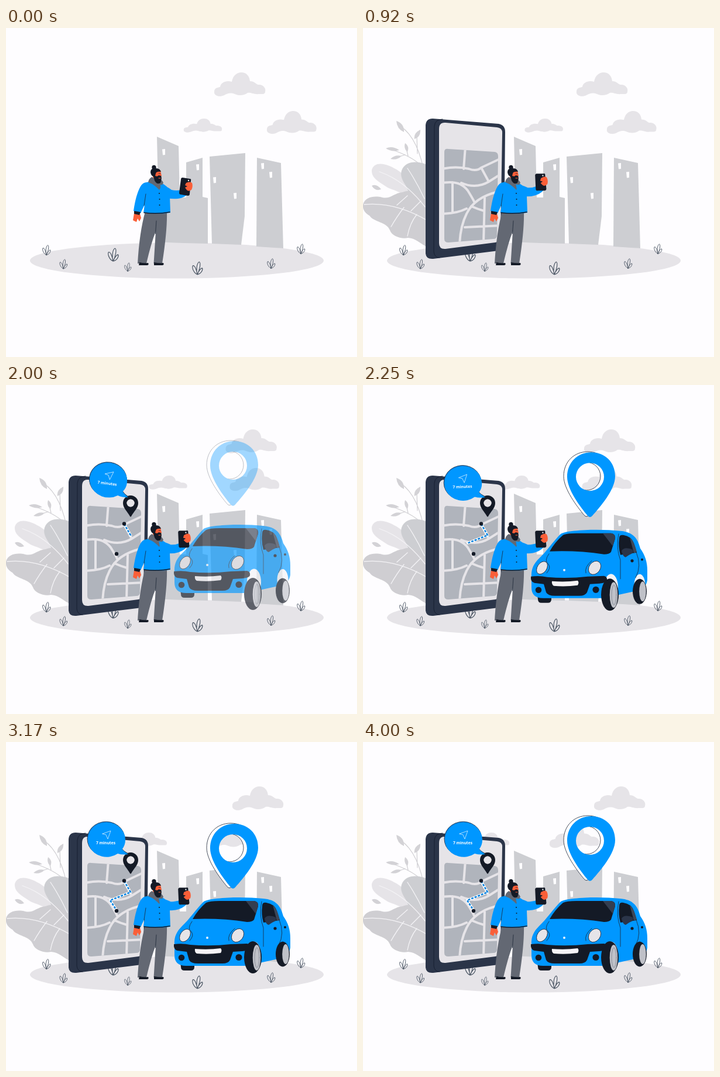
These frames come from a looping animation (600 by 563 pixels, 4080 ms). An HTML page:

```html
<!DOCTYPE html>
<html lang="en">
<head>
<meta charset="utf-8">
<title>Ride booking</title>
<style>
html, body { margin: 0; width: 100%; height: 100%; overflow: hidden; background: #fefdff; }
svg { display: block; width: 100%; height: 100%; }
.line { fill: none; stroke-linecap: round; stroke-linejoin: round; }
.blue { fill: #0097ff; }
.ink { fill: #141a26; }
.navy { fill: #2b3549; }
.skin { fill: #fa5f38; }
.pale { fill: #e6e4e8; }
.grey { fill: #cdced2; }
.cloth { fill: #636873; }
.thin { stroke: #1c2636; stroke-width: .8; }
</style>
</head>
<body>
<svg viewBox="0 0 600 563" preserveAspectRatio="none">
  <defs>
    <path id="cloud" d="M1 33C1 26 7 26 11 25C12 17 22 13 31 16C33 5 40 0 47 0C56 0 61 6 62 15C70 15 72 20 76 21C84 20 90 27 88 33C88 38 82 37 78 37C68 38 64 34 58 35C52 40 42 40 36 37C28 34 24 36 18 39C10 43 0 40 1 33Z"/>
    <path id="marker" fill-rule="evenodd" d="M349 182C349 157 367 140 390 140C414 140 431 157 431 181C431 204 405 234 392 248.500Q388 253 384 248.500C372 234 349 204 349 182ZM364 182A24 24 0 1 0 412 182A24 24 0 1 0 364 182Z"/>
    <path id="tuft" d="M0 10C-5 8 -9 0 -7 -4C-4 -5 -1 3 0 10C-2 3 -1 -8 3 -10C6 -9 4 3 0 10C2 5 6 -1 8 0C9 3 6 9 0 10"/>
    <path id="bubble" d="M203 166A32 29.500 0 1 0 190 189.500Q198 192 208 190.500Q201 187 197.500 182Q203 175 203 166Z"/>
    <clipPath id="land"><path d="M139 212Q139 206 146 207L225 212Q231 213 231 219L229 356Q228 361 223 361L146 367Q139 367 139 361Z"/></clipPath>
  </defs>
  <rect width="600" height="563" fill="#fefdff"/>

  <g class="pale">
    <use id="cloudA" href="#cloud"/>
    <use id="cloudB" href="#cloud"/>
    <use id="cloudC" href="#cloud"/>
  </g>

  <ellipse class="pale" cx="292" cy="398" rx="251" ry="30.500"/>
  <g class="grey">
    <path d="M258 186L295 202L297 290H308V230L336 222V289L345 291V369L262 367Z"/>
    <path d="M348 220L409 214L408 322L402 371L352 369Z"/>
    <path d="M429 222L470 231L474 377L428 374Z"/>
  </g>
  <g id="windows" fill="#fefdff"></g>
  <g id="grass" class="line" stroke="#4a5563" stroke-width="1.100"></g>

  <!-- big handset with plants behind it -->
  <g id="device">
    <g class="line" stroke="#cfced2" stroke-width="1.200">
      <path d="M107 262Q97 190 64 168M93 215L92 184M101 237Q85 220 46 207M72 217L59 221M77 219L74 206"/>
    </g>
    <g fill="#d3d2d6">
      <path d="M57 159Q71 164 70 178Q58 173 57 159ZM98 174Q99 186 88 190Q86 180 98 174ZM39 206Q50 201 62 209Q50 213 39 206ZM47 224Q55 216 66 219Q58 227 47 224ZM72 197Q80 203 76 212Q69 206 72 197ZM15 270Q23 266 31 276Q21 280 15 270Z"/>
    </g>
    <path class="pale" d="M15 243C18 231 31 230 45 236C72 247 90 270 107 300L80 292C65 280 50 277 42 273C27 263 14 257 15 243Z"/>
    <path class="grey" d="M66 244C72 228 91 227 107 233V312L78 288C80 270 61 262 66 244Z"/>
    <path fill="#cfced2" d="M0 302C4 288 21 287 33 290C48 293 53 282 68 281C84 274 98 284 112 302V376C97 369 91 360 77 359C66 362 49 356 46 346C40 331 19 333 11 321C4 317 -1 311 0 302Z"/>
    <g class="line" stroke="#f4f3f6" stroke-width="1.300">
      <path d="M28 246Q70 260 106 306M76 240Q92 264 105 292M2 302Q55 297 111 330M58 303L76 287M82 313L99 296M48 340Q57 324 70 307M76 356Q80 334 92 319"/>
    </g>
    <path class="navy" d="M107 166Q108 155 119 155L232 164Q243 166 243 178L241 371Q241 380 232 381L120 395Q108 396 107 386Z"/>
    <path class="line" stroke="#171f31" stroke-width="1" d="M136 156Q123 156 122 168L121 383Q122 393 131 393"/>
    <path class="pale" d="M130 173Q130 161 141 162L229 170Q239 171 238 181L235 356Q235 366 226 367L141 378Q130 379 130 368Z"/>
    <g clip-path="url(#land)">
      <rect x="130" y="200" width="110" height="175" fill="#b0b4bc"/>
      <g class="line" stroke="#e6e4e8" stroke-width="4">
        <path d="M175 203L172 241M136 241Q158 236 181 241Q194 246 202 239L234 224M202 239L215 263L234 251M136 265Q166 260 179 278Q187 291 190 297M215 263Q193 276 168 265M153 264V316M136 318Q162 317 177 309M236 279Q191 288 177 318Q166 340 165 372M208 291L206 367M174 341L235 338M185 305Q196 310 207 313"/>
      </g>
    </g>
  </g>

  <g class="line">
    <path id="casing" stroke="#fff" stroke-width="4.400"/>
    <path id="route" stroke="#0b83df" stroke-width="2.600" stroke-dasharray="4 2" style="stroke-linecap:butt"/>
  </g>
  <g id="spots" class="ink">
    <circle cx="202" cy="237.500" r="3.200"/>
    <circle cx="189" cy="289" r="3.200"/>
  </g>
  <g id="mapPin">
    <path class="ink" fill-rule="evenodd" d="M200 202A13 13 0 0 1 226 202C226 211 218 217 214.500 224Q213 227 211.500 224C208 217 200 211 200 202ZM206.500 202A6.500 6.500 0 1 0 219.500 202A6.500 6.500 0 1 0 206.500 202Z"/>
    <circle class="pale" cx="213" cy="202" r="6.500"/>
  </g>
  <g id="note">
    <use href="#bubble" class="thin" fill="#0784e4" stroke-width="1"/>
    <use href="#bubble" class="blue" x="1" y="1.500"/>
    <path class="line" stroke="#d9efff" stroke-width=".8" d="M165 157L179 152L174 166L171 159Z"/>
    <text x="170.500" y="175" text-anchor="middle" fill="#fff" font-family="'Open Sans', 'Noto Sans', sans-serif" font-weight="700" font-size="6.700">7 minutes</text>
  </g>

  <!-- car -->
  <g id="car">
    <g id="body">
      <path class="ink" d="M298 376H322V385Q322 391 316 391H305Q299 391 299 385Z"/>
      <path class="blue" d="M288 347C287 333 292 324 301 315C313 304 325 286 338 273C349 266 405 264 440 268C461 270 469 279 474 298C482 309 486 321 486 336V352Q484 366 470 370L438 377Q424 383 405 383H308C294 383 288 376 288 365Z"/>
      <ellipse fill="#f3f3f6" cx="424" cy="364" rx="12" ry="22.500"/>
      <ellipse fill="#f3f3f6" cx="473" cy="361" rx="9.500" ry="19"/>
      <path class="ink" d="M319 303Q328 287 342 275Q348 272 365 272L424 272Q432 273 431 281L424 304Q421 308 412 308Q366 301 319 303Z"/>
      <path fill="#343e50" d="M410 272H424Q432 273 431 281L427 294Z"/>
      <path class="ink" d="M438 280Q438 274 445 275Q459 277 463 289L468 305L440 309Q436 296 438 280Z"/>
      <path fill="#3c4657" d="M456 279Q463 284 468 304L463 306Z"/>
      <path class="navy" d="M442 302Q445 296 455 298Q464 299 461 306Q454 309 449 313Q444 312 442 302Z"/>
      <g class="line thin">
        <path d="M437 273Q432 296 440 318V350M467 304Q477 328 466 348M318 307Q309 319 317 325Q322 331 314 340M381 340Q378 330 391 319"/>
      </g>
      <g class="pale thin">
        <ellipse cx="306" cy="331" rx="8" ry="12" transform="rotate(34 306 331)"/>
        <ellipse cx="396" cy="331" rx="9.500" ry="12.500" transform="rotate(36 396 331)"/>
      </g>
      <circle cx="344" cy="335" r="2" fill="#e9f4ff"/>
      <path class="ink" d="M287 346Q302 344 315 347Q350 350 384 346L412 345Q418 346 417 353Q416 357 404 358L388 359L383 373Q380 379 370 379H328Q316 379 313 373L309 359L293 357Q286 355 287 346Z"/>
      <path fill="#f5f3f6" d="M323 354Q346 356 367 353Q370 356 367 361Q346 364 326 362Q322 359 323 354Z"/>
      <g class="ink">
        <circle cx="300" cy="369" r="5.300"/>
        <circle cx="398" cy="368.500" r="5.600"/>
        <circle cx="460" cy="319" r="2.600"/>
        <circle cx="477" cy="317" r="2"/>
      </g>
    </g>
    <g id="wheels">
      <ellipse class="ink" cx="422" cy="368.500" rx="15" ry="27.500"/>
      <ellipse fill="#bfc1c8" cx="428.500" cy="369" rx="6.800" ry="22"/>
      <ellipse class="line" stroke="#8a8f9a" stroke-width="1" cx="429" cy="369" rx="4" ry="17"/>
      <ellipse class="ink" cx="473" cy="363" rx="12" ry="21.500"/>
      <ellipse fill="#bfc1c8" cx="478" cy="363" rx="5.800" ry="17"/>
    </g>
  </g>
  <g id="bigPin">
    <use href="#marker" x="-6" y="-1" fill="#fefdff" class="thin"/>
    <use href="#marker" class="blue"/>
  </g>

  <!-- man -->
  <g>
    <path class="skin" d="M219 317L229 318L231 325L228 331L225 326L223 332L217 329Z"/>
    <path class="cloth" d="M238 314H275Q276 345 267 403H252.500L256 348Q248 368 240 403H225Q228 350 238 314Z"/>
    <path class="line thin" d="M257 330L255.500 352"/>
    <path class="ink" d="M228 401Q236 403 243 402Q245 406 241 406H227ZM253 401Q262 403 269 402Q271 406 267 406H253Z"/>
    <path class="blue" d="M241 264Q255 259 269 267Q280 273 280 288L281 316Q259 320 235 316L237 302L230 317L218 313Q222 285 230 271Q234 264 241 264Z"/>
    <path class="line" stroke="#141a26" stroke-width="1.500" d="M236 316Q258 319 280 315"/>
    <path class="line thin" d="M239 284L236 304"/>
    <path class="ink" d="M219 313L230 315L228 320L219 318Z"/>
    <g class="ink">
      <circle cx="262" cy="283" r="1"/><circle cx="262.500" cy="293" r="1"/><circle cx="262.500" cy="303" r="1"/>
    </g>
    <path class="cloth" d="M249 255Q244 258 243 264Q253 267 262 277L269 265Q267 259 261 260Z"/>
    <path class="skin" d="M251 244H264L266 253L260 260L251 256Z"/>
    <path class="ink" d="M247 247Q247 240 254 240Q263 239 265 246Q257 245 256 249L255 253Q259 255 261 252L265 253Q267 258 264 265Q258 269 254 261L252 254Q248 253 247 247Z"/>
    <circle class="ink" cx="253" cy="238.500" r="3.700"/>
    <path class="line" stroke="#141a26" stroke-width=".7" d="M261 249H264"/>
    <path class="line" stroke="#fa5f38" stroke-width="1" d="M261 257H264"/>
    <g id="arm">
      <path class="blue" d="M264 268Q274 270 283 277Q291 279 300 277L313 282Q305 291 294 292Q276 294 264 285Z"/>
      <path class="ink" d="M302 256L314 258Q317 258 316 261L314 284Q314 287 311 287L299 285Q296 285 296 282L299 259Q299 256 302 256Z"/>
      <circle cx="312" cy="261" r="1.200" fill="#e9e9ec"/>
      <path class="skin" d="M308 265Q314 262 318 265Q320 271 317 277Q311 281 308 276L306 273L310 271L306 269Z"/>
    </g>
  </g>
</svg>
<script>
const LOOP = 4080, STEP = 1000 / 12;
const $ = id => document.getElementById(id);
const set = (id, name, value) => $(id).setAttribute(name, value);
const clamp = x => Math.max(0, Math.min(1, x));
const span = (t, a, b) => clamp((t - a) / (b - a));
const inOut = p => p < .5 ? 4 * p ** 3 : 1 - 4 * (1 - p) ** 3;
const back = p => 1 + 2.7 * (p - 1) ** 3 + 1.7 * (p - 1) ** 2;

// keys: time, value, time, value...
function track(t, ...keys) {
  for (let i = 2; i < keys.length; i += 2) {
    if (t <= keys[i]) return keys[i - 1] + (keys[i + 1] - keys[i - 1]) * span(t, keys[i - 2], keys[i]);
  }
  return keys[keys.length - 1];
}

const move = (id, x, y) => set(id, 'transform', `translate(${x} ${y})`);
const zoom = (id, s, x, y, turn = 0) => {
  set(id, 'display', s > .001 ? 'inline' : 'none');
  set(id, 'transform', `translate(${x} ${y}) rotate(${turn}) scale(${s}) translate(${-x} ${-y})`);
};

$('windows').innerHTML = [[267, 207], [325, 233], [354, 255], [389, 282], [436, 231], [450, 246]]
  .map(([x, y]) => `<path d="M${x} ${y + .5}L${x + 5} ${y}V${y + 10}L${x + 1} ${y + 10.5}Z"/>`).join('');
$('grass').innerHTML = [[69, 380, .85], [98, 404, .8], [183, 388, 1.1], [208, 409, .72], [327, 411, 1.08], [453, 403, .83], [504, 378, .83]]
  .map(([x, y, s]) => `<use href="#tuft" transform="translate(${x} ${y}) scale(${s})"/>`).join('');

const stops = [[202, 238], [213, 257], [178, 271], [189, 288]];
function partial(p) {
  const legs = stops.slice(1).map((b, i) => Math.hypot(b[0] - stops[i][0], b[1] - stops[i][1]));
  let left = p * legs.reduce((a, b) => a + b);
  let d = 'M' + stops[0];
  legs.forEach((len, i) => {
    if (left <= 0) return;
    const k = Math.min(1, left / len), a = stops[i], b = stops[i + 1];
    d += `L${a[0] + (b[0] - a[0]) * k} ${a[1] + (b[1] - a[1]) * k}`;
    left -= len;
  });
  return d;
}

function draw(t) {
  const drift = t / 4000;
  move('cloudA', 355 + 39 * drift, 76);
  set('cloudB', 'transform', `translate(${303 - 119 * drift} 155) scale(.75 .58)`);
  set('cloudC', 'transform', `translate(${445 - 127 * drift} 142) scale(.97 .96)`);

  set('arm', 'transform', `rotate(${-10 * inOut(span(t, 0, 500))} 261 283)`);
  zoom('device', inOut(span(t, 143, 765)), 180, 394);
  zoom('mapPin', back(span(t, 1160, 1640)), 165, 243);
  zoom('spots', span(t, 1600, 1800), 195, 263);

  const tilt = track(t, 1600, -20, 2000, 7, 2250, -2, 2420, 0);
  zoom('note', back(span(t, 1600, 1950)), 208, 191, tilt);

  const drawn = span(t, 1840, 2400);
  for (const id of ['casing', 'route']) {
    set(id, 'd', partial(drawn));
    set(id, 'display', drawn ? 'inline' : 'none');
  }

  set('car', 'opacity', track(t, 1800, 0, 2000, .65, 2170, 1));
  move('body', 0, -33.4 * (1 - span(t, 1830, 2950)) ** 1.29);
  move('wheels', 0, track(t, 1830, -12, 2000, -11, 2580, -8, 2920, 0));

  set('bigPin', 'opacity', track(t, 1900, 0, 2000, .36, 2250, 1));
  move('bigPin', 0, track(t, 1900, -51, 2000, -44, 2300, -21, 2580, -9, 2900, -1, 3170, 0, 3580, -4, 4000, -13));
}

function tick(now) {
  draw(Math.floor((now % LOOP + 4) / STEP) * STEP);
  requestAnimationFrame(tick);
}
draw(0);
requestAnimationFrame(tick);
</script>
</body>
</html>
```
